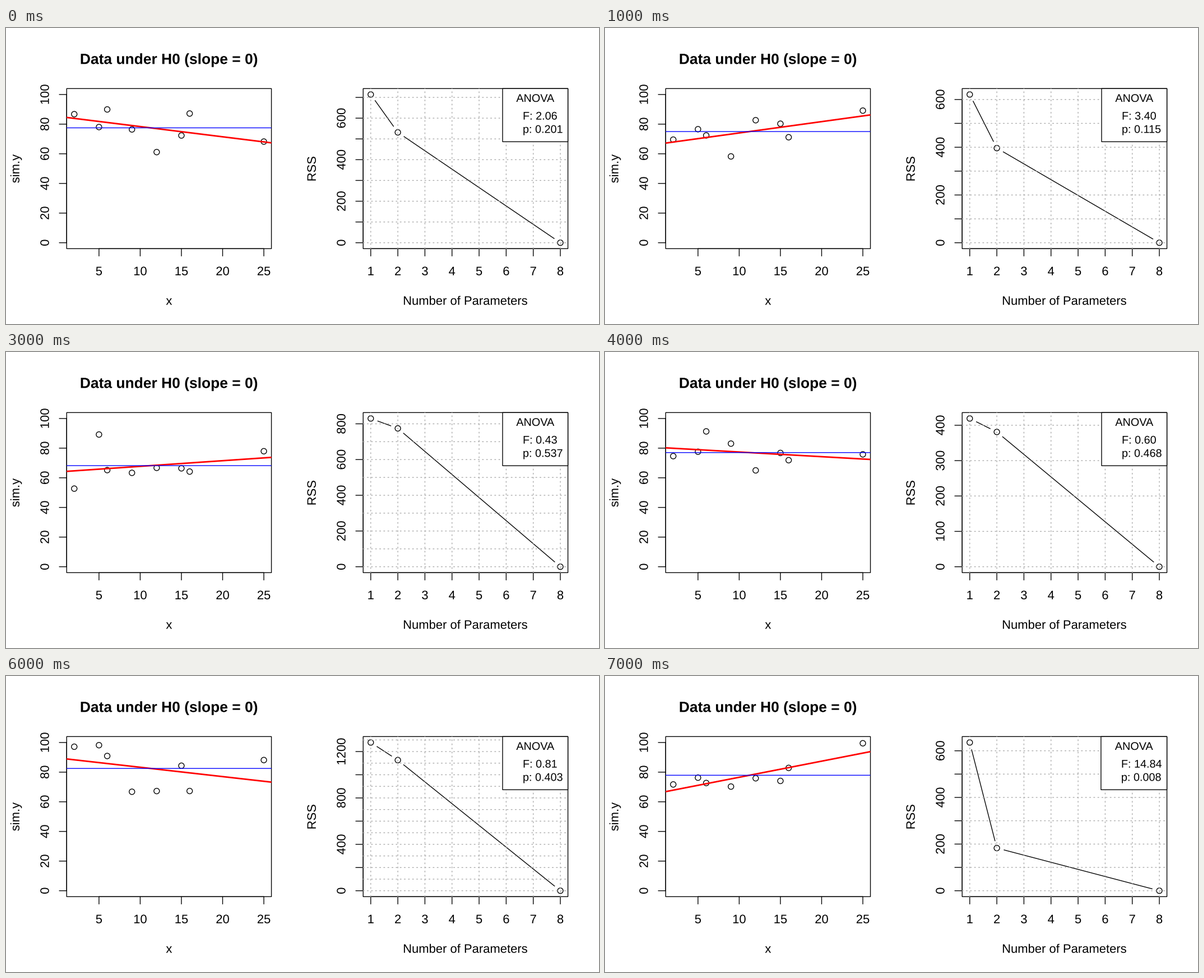
Animation of 1058 by 529 pixels, one loop 8000 ms. Source, as a matplotlib script:

```python
import math

import matplotlib.pyplot as plt
import numpy as np
from matplotlib.animation import FuncAnimation
from matplotlib.patches import Circle, PathPatch, Rectangle
from matplotlib.textpath import TextPath
from matplotlib.transforms import Affine2D

plt.rcParams["path.snap"] = False

W, H, DPI = 1058, 529, 100
PT = 72 / DPI              # points per pixel
LINE = 26.4                # height of one margin line
FONT = 22
LWD = 1.375
TOP, BOTTOM = 4.1 * LINE, H - 5.1 * LINE
WIDTH = W / 2 - 6.2 * LINE
LEFT1 = 4.1 * LINE
LEFT2 = W / 2 + LEFT1
SPAN_X, SPAN_Y = WIDTH / 1.08, (BOTTOM - TOP) / 1.08
ZERO_Y = BOTTOM - 0.04 * SPAN_Y
LABEL_GAP = 0.833 * FONT

X = np.array([2, 5, 6, 9, 12, 15, 16, 25])
DX = X - X.mean()
SXX = DX @ DX

# mean, fitted slope and F statistic of each simulated sample
FITS = [
    (77.5, -0.6898, 2.06),
    (75.0, 0.7653, 3.40),
    (75.6, -0.5789, 2.00),
    (68.2, 0.3800, 0.429),
    (77.0, -0.3152, 0.60),
    (76.5, 0.3238, 0.878),
    (82.5, -0.6296, 0.81),
    (77.9, 1.0863, 14.84),
]

fig = plt.figure(figsize=(W / DPI, H / DPI), dpi=DPI, facecolor="white")
ax = fig.add_axes([0, 0, 1, 1])
ax.set_xlim(0, W)
ax.set_ylim(H, 0)
ax.axis("off")


def left_x(v):
    return LEFT1 + 0.04 * SPAN_X + (v - 2) / 23 * SPAN_X


def left_y(v):
    return ZERO_Y - v / 100 * SPAN_Y


def right_x(v):
    return LEFT2 + 0.04 * SPAN_X + (v - 1) / 7 * SPAN_X


def line(x0, y0, x1, y1, color="black", lwd=1, z=2, cap="round", **kw):
    return ax.plot([x0, x1], [y0, y1], color=color, lw=lwd * LWD * PT, zorder=z,
                   solid_capstyle=cap, dash_capstyle="round", **kw)[0]


def dotted(x0, y0, x1, y1):
    return line(x0, y0, x1, y1, color="#a9a9a9", z=4, ls=(0, (4 / 3, 4)))


def advance(s, size=FONT):
    """Set width of digits and short statistics."""
    em = {" ": 0.278, ".": 0.278, ":": 0.278, "F": 0.611}
    return size * sum(em.get(c, 0.556) for c in s)


def text(x, y, s, size=FONT, center=True, angle=0, weight="normal", z=2):
    path = TextPath((0, 0), s, size,
                    prop={"family": "Liberation Sans", "weight": weight})
    shift = 0
    if center:
        box = path.get_extents()
        shift = advance(s, size) / 2 if s.isdigit() else (box.x0 + box.x1) / 2
    place = Affine2D().translate(-shift, 0).scale(1, -1)
    place.rotate_deg(-angle).translate(x, y)
    return ax.add_patch(PathPatch(path.transformed(place), fc="black", lw=0,
                                  zorder=z))


def rect(x, y, w, h, fill="none", z=2):
    return ax.add_patch(Rectangle((x, y), w, h, fc=fill, ec="black",
                                  lw=LWD * PT, zorder=z))


def dot(x, y):
    return ax.add_patch(Circle((x, y), 4.95, fc="none", ec="black",
                               lw=LWD * PT, zorder=2))


def x_axis(to_x, values):
    line(to_x(values[0]), BOTTOM, to_x(values[-1]), BOTTOM)
    for v in values:
        line(to_x(v), BOTTOM, to_x(v), BOTTOM + LINE / 2)
        text(to_x(v), BOTTOM + 1.8 * LINE, str(v))


def y_label(left, y, label, row=1):
    return text(left - (row + 0.2) * LINE, y, label, angle=90)


def y_axis(left, to_y, values):
    """Ticks with labels; a label too close to the one before is skipped."""
    parts = [line(left, to_y(values[0]), left, to_y(values[-1]))]
    edge = H
    for v in values:
        y, half = to_y(v), advance(str(v)) / 2
        parts.append(line(left, y, left - LINE / 2, y))
        if edge - (y + half) >= LABEL_GAP:
            parts.append(y_label(left, y, str(v)))
            edge = y - half
    return parts


def gapped(x0, y0, x1, y1):
    """Line between two points that keeps clear of both."""
    d = math.hypot(x1 - x0, y1 - y0)
    ux, uy = (x1 - x0) / d * LINE / 2, (y1 - y0) / d * LINE / 2
    return line(x0 + ux, y0 + uy, x1 - ux, y1 - uy)


def p_value(f):
    """Upper tail of F(1, 6)."""
    c2 = 6 / (6 + f)
    return 1 - math.sqrt(1 - c2) * (1 + c2 / 2 + 3 * c2 * c2 / 8)


def simulate(mean, slope, rss, seed):
    """Random sample with exactly this fit, kept within the scale."""
    rng = np.random.default_rng(seed)
    while True:
        noise = rng.normal(size=len(X))
        noise -= noise.mean()
        noise -= DX * (noise @ DX) / SXX
        y = mean + slope * DX + noise * math.sqrt(rss / (noise @ noise))
        if y.min() > 50 and y.max() < 100:
            return y


def draw_static():
    for left, xlab, ylab in ((LEFT1, "x", "sim.y"),
                             (LEFT2, "Number of Parameters", "RSS")):
        rect(left, TOP, WIDTH, BOTTOM - TOP)
        text(left + WIDTH / 2, BOTTOM + 3.8 * LINE, xlab)
        y_label(left, (TOP + BOTTOM) / 2, ylab, row=3)
    text(LEFT1 + WIDTH / 2, 64.3, "Data under H0 (slope = 0)",
         size=1.2 * FONT, weight="bold")
    x_axis(left_x, range(5, 26, 5))
    y_axis(LEFT1, left_y, range(0, 101, 20))
    x_axis(right_x, range(1, 9))
    for v in range(1, 9):
        dotted(right_x(v), BOTTOM, right_x(v), TOP)


def draw_fit(mean, slope, y):
    right, blue_y = LEFT1 + WIDTH, left_y(mean)
    lo, hi = 2 - 0.92 - X.mean(), 25 + 0.92 - X.mean()
    parts = [dot(left_x(a), left_y(b)) for a, b in zip(X, y)]
    parts.append(line(LEFT1, left_y(mean + slope * lo), right,
                      left_y(mean + slope * hi), "red", 2, 3, "butt"))
    parts.append(line(LEFT1, blue_y, right, blue_y, "blue", 1, 3.1, "butt"))
    return parts


def draw_rss(rss0, rss1):
    def to_y(v):
        return ZERO_Y - v / rss0 * SPAN_Y

    top = 1.04 * rss0
    pts = [(right_x(n), to_y(v)) for n, v in ((1, rss0), (2, rss1), (8, 0))]
    parts = [dot(*p) for p in pts]
    parts += [gapped(*a, *b) for a, b in zip(pts, pts[1:])]
    parts += [dotted(LEFT2, to_y(v), LEFT2 + WIDTH, to_y(v))
              for v in range(0, int(top) + 1, 100)]
    step = next(s for s in (50, 100, 200) if top / s < 8)
    return parts + y_axis(LEFT2, to_y, range(0, int(top) + 1, step))


def draw_legend(f):
    size, row, pad = 0.9 * FONT, 0.9 * LINE, 18
    rows = [f"F: {f:.2f}", f"p: {p_value(f):.3f}"]
    w = max(advance(s, size) for s in rows) + 2.5 * pad
    x = LEFT2 + WIDTH - w
    parts = [rect(x, TOP, w, 4 * row, "white", 5),
             text(x + w / 2, TOP + row, "ANOVA", size, z=6)]
    for i, s in enumerate(rows):
        parts.append(text(x + 2 * pad, TOP + (i + 2) * row + 0.4 * size, s,
                          size, center=False, z=6))
    return parts


shown = []


def update(i):
    while shown:
        shown.pop().remove()
    mean, slope, f = FITS[i]
    gain = slope ** 2 * SXX
    rss1 = 6 * gain / f
    y = simulate(mean, slope, rss1, seed=i)
    shown.extend(draw_fit(mean, slope, y) + draw_rss(gain + rss1, rss1)
                 + draw_legend(f))
    return shown


draw_static()
anim = FuncAnimation(fig, update, frames=len(FITS), interval=1000,
                     init_func=lambda: [], repeat=True, repeat_delay=0,
                     blit=False)
plt.show()
```
